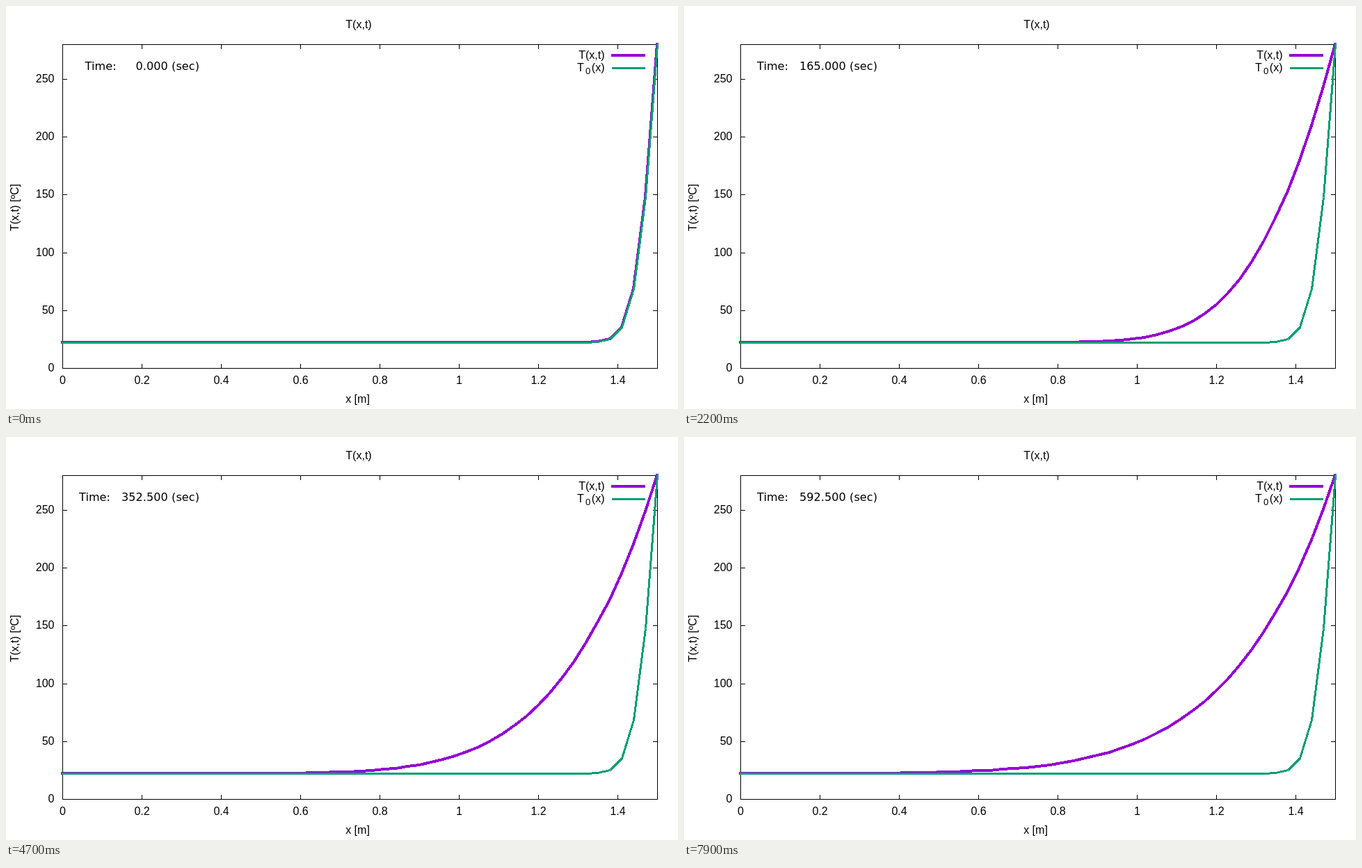
An HTML page that plays this animation: 966 by 580 pixels, repeating every 8 s.

```html
<!DOCTYPE html>
<html lang="en">
<head>
<meta charset="utf-8">
<title>Heat conduction along a rod</title>
<style>
html, body { margin: 0; width: 100%; height: 100%; overflow: hidden; background: #fff; }
svg { display: block; }
text { font: 16px "Liberation Sans", Arial, sans-serif; white-space: pre; }
.clock { font: 16px "DejaVu Sans", sans-serif; letter-spacing: .1px; }
.mid { text-anchor: middle; }
.end { text-anchor: end; }
path { fill: none; stroke-linejoin: round; shape-rendering: crispEdges; }
.axes { stroke: #000; }
.now { stroke: #9400d3; stroke-width: 4; }
.start { stroke: #009e73; stroke-width: 3; }
.curve { stroke-linecap: square; }
</style>
</head>
<body>
<svg width="966" height="580" viewBox="0 0 966 580">
  <path class="axes" id="axes"/>
  <g id="labels"></g>
  <text class="mid" x="507" y="32">T(x,t)</text>
  <text class="mid" x="505.5" y="571">x [m]</text>
  <text class="mid" transform="translate(18 290) rotate(-90)">T(x,t) [ºC]</text>
  <text class="end" x="860.5" y="76">T(x,t)</text>
  <text x="821" y="94">T</text>
  <text x="833" y="98" style="font-size:13px">0</text>
  <text class="end" x="860.5" y="94">(x)</text>
  <text class="clock" id="word" y="92">Time:</text>
  <text class="clock end" id="clock" x="278" y="92"></text>
  <path class="now" d="M870 71H919"/>
  <path class="now curve" id="now"/>
  <path class="start" d="M871 89.5H919"/>
  <path class="start curve" id="start" transform="translate(.5 .5)"/>
</svg>
<script>
const $ = id => document.getElementById(id);
const FRAMES = 80, FRAME_MS = 100, FRAME_SEC = 7.5;
const CELLS = 50, DX = 0.03, AMBIENT = 22, HOT = 280;
const DIFFUSION = 1.3e-4, LOSS = DIFFUSION * 3.9 ** 2;
const SUBSTEPS = 10, DT = FRAME_SEC / SUBSTEPS;

const px = x => Math.round(81 + x * 570);
const py = T => Math.round(521 - T * 466 / 280);
const curve = temps => "M" + temps.map((T, i) => px(i * DX) + " " + py(T)).join("L");

// Frame, ticks and tick labels
let axes = "M81.5 55.5H936.5V521.5H81.5Z", labels = "";
for (let i = 0; i < 8; i++) {
  const x = px(i / 5);
  if (i) axes += `M${x + .5} 521v-6M${x + .5} 56v6`;
  labels += `<text class="mid" x="${x + .5}" y="544">${i / 5}</text>`;
}
for (let T = 0; T <= 250; T += 50) {
  const y = py(T);
  if (T) axes += `M82 ${y + .5}h6M936 ${y + .5}h-6`;
  labels += `<text class="end" x="69.5" y="${y + 5}">${T}</text>`;
}
$("axes").setAttribute("d", axes);
$("labels").innerHTML = labels;

// Explicit heat equation with loss to the surroundings, fixed end temperatures
function step(temps) {
  return temps.map((T, i) => {
    if (i === 0 || i === CELLS) return T;
    const bend = (temps[i - 1] - 2 * T + temps[i + 1]) / DX ** 2;
    return T + DT * (DIFFUSION * bend - LOSS * (T - AMBIENT));
  });
}

const initial = Array(CELLS + 1).fill(AMBIENT);
[HOT, 148, 68.5, 35.5, 25, 22.6].forEach((T, i) => initial[CELLS - i] = T);
$("start").setAttribute("d", curve(initial));

const curves = [];
let temps = initial;
for (let f = 0; f < FRAMES; f++) {
  curves.push(curve(temps));
  for (let s = 0; s < SUBSTEPS; s++) temps = step(temps);
}

let shown = -1;
function draw() {
  const frame = Math.floor(performance.now() / FRAME_MS) % FRAMES;
  if (frame !== shown) {
    shown = frame;
    const seconds = (frame * FRAME_SEC).toFixed(3);
    $("now").setAttribute("d", curves[frame]);
    $("clock").textContent = seconds + " (sec)";
    $("word").setAttribute("x", 105 + 4.3 * (7 - seconds.length));
  }
  requestAnimationFrame(draw);
}
draw();
</script>
</body>
</html>
```
